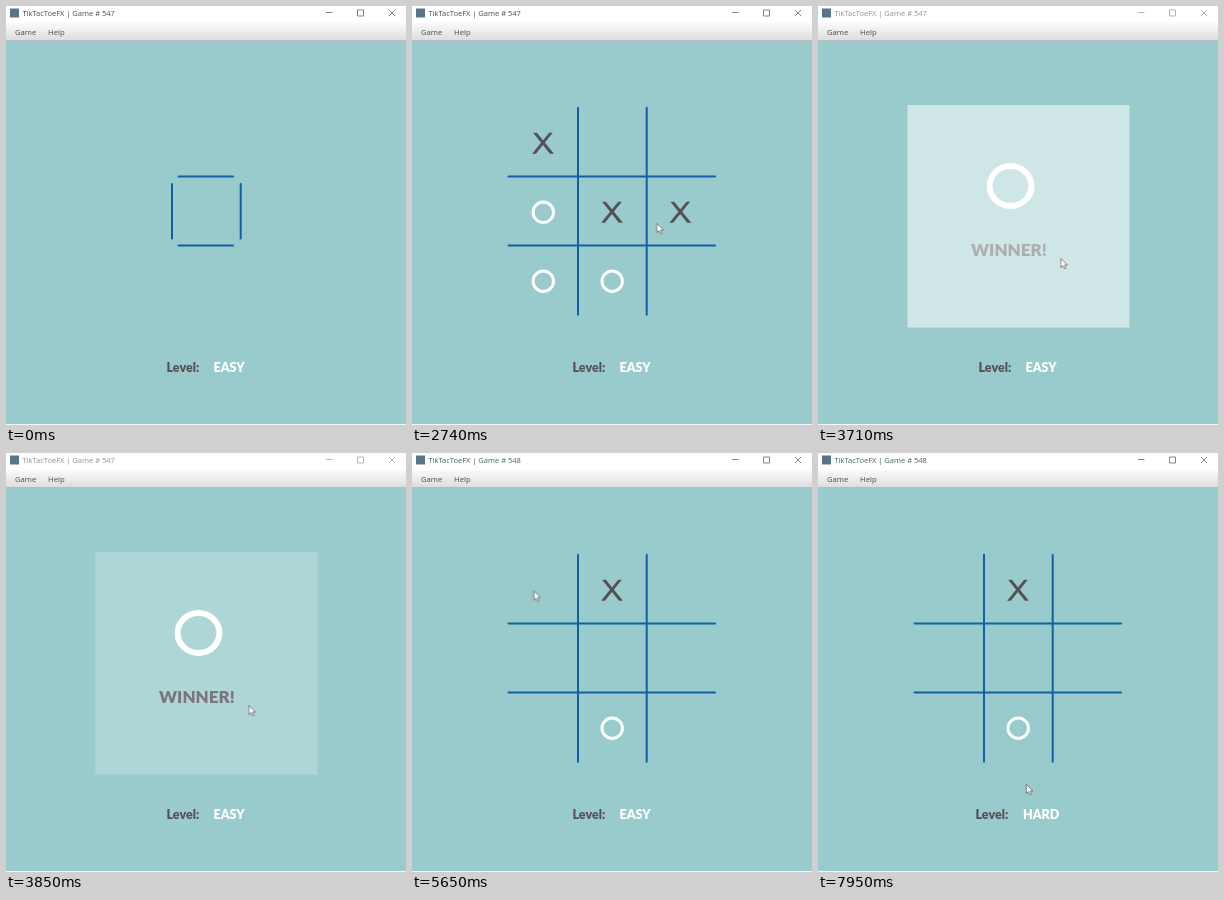
Animation of 400 by 419 pixels, one loop 8 s. Source, as an HTML page:

```html
<!DOCTYPE html>
<html lang="en">
<head>
<meta charset="utf-8">
<title>TikTacToeFX</title>
<style>
html, body { margin: 0; width: 100%; height: 100%; overflow: hidden; background: #99cbcc; }
svg { display: block; width: 100%; height: 100%; }
text { font: 7.7px "Open Sans", "Noto Sans", sans-serif; fill: #4a4a4a; }
.title { font-size: 7.5px; }
.bold { font: 900 12.5px Lato, "Open Sans", sans-serif; fill: #555056; }
.win { font-size: 17px; }
.white { fill: #fff; }
.hi { fill: #0096c9; }
.grid line { stroke: #1160a6; stroke-width: 2; stroke-linecap: round; vector-effect: non-scaling-stroke; }
.popup { filter: drop-shadow(0 1.5px 2px #0007); }

/* 1% = 80 ms */
.step, .flash, .cursor, .grid line { animation: 8s infinite; }
.step { animation-timing-function: step-end; }
.grid .h { animation-name: growX; transform-origin: 199.8px 205px; }
.grid .v { animation-name: growY; transform-origin: 200px 205.3px; }
@keyframes growX {
  0% { transform: scaleX(.264); animation-timing-function: steps(6); }
  5.25% { transform: none; animation-timing-function: step-end; }
  57.75% { transform: scaleX(.264); animation-timing-function: steps(3); }
  60.375%, 100% { transform: none; }
}
@keyframes growY {
  0% { transform: scaleY(.264); animation-timing-function: steps(6); }
  5.25% { transform: none; animation-timing-function: step-end; }
  57.75% { transform: scaleY(.264); animation-timing-function: steps(3); }
  60.375%, 100% { transform: none; }
}
.grid { animation-name: grid; }
@keyframes grid { 0% { opacity: 1 } 43.75% { opacity: 0 } 57.75%, 100% { opacity: 1 } }

.round1 { animation-name: round1; }
@keyframes round1 { 0% { opacity: 1 } 43.75%, 100% { opacity: 0 } }
.m1 { animation-name: m1; }
@keyframes m1 { 0% { opacity: 0 } 18.875%, 100% { opacity: 1 } }
.m2 { animation-name: m2; }
@keyframes m2 { 0% { opacity: 0 } 24.625%, 100% { opacity: 1 } }
.m3 { animation-name: m3; }
@keyframes m3 { 0% { opacity: 0 } 29.25%, 100% { opacity: 1 } }
.m4 { animation-name: m4; }
@keyframes m4 { 0% { opacity: 0 } 40.25%, 100% { opacity: 1 } }
.round2 { animation-name: round2; }
@keyframes round2 { 0% { opacity: 0 } 65.875%, 100% { opacity: 1 } }

.winner { animation-name: winner; }
@keyframes winner { 0% { opacity: 0 } 43.75% { opacity: 1 } 57.5%, 100% { opacity: 0 } }
.flash { animation-name: flash; animation-timing-function: linear; }
@keyframes flash { 0%, 41.125% { opacity: 0 } 43.75% { opacity: 1 } 49.375%, 100% { opacity: 0 } }

.before { animation-name: before; }
@keyframes before { 0% { opacity: 1 } 57.75%, 100% { opacity: 0 } }
.after { animation-name: after; }
@keyframes after { 0% { opacity: 0 } 57.75%, 100% { opacity: 1 } }
.chrome { animation-name: chrome; }
@keyframes chrome { 0% { opacity: 1 } 41.125% { opacity: .6 } 57.75%, 100% { opacity: 1 } }

.menu { animation-name: menu; }
@keyframes menu { 0% { opacity: 0 } 77.25% { opacity: 1 } 92.5%, 100% { opacity: 0 } }
.row { animation-name: row; }
@keyframes row { 0% { opacity: 0 } 79.75%, 100% { opacity: 1 } }
.sub { animation-name: sub; }
@keyframes sub { 0% { opacity: 0 } 81.875% { opacity: 1 } 92.5%, 100% { opacity: 0 } }
.pickEasy { animation-name: pickEasy; }
@keyframes pickEasy { 0% { opacity: 1 } 89.25%, 100% { opacity: 0 } }
.pickHard { animation-name: pickHard; }
@keyframes pickHard { 0% { opacity: 0 } 89.25%, 100% { opacity: 1 } }
.easy { animation-name: easy; }
@keyframes easy { 0% { opacity: 1 } 92.5%, 100% { opacity: 0 } }
.hard { animation-name: hard; }
@keyframes hard { 0% { opacity: 0 } 92.5%, 100% { opacity: 1 } }

.show { animation-name: show; }
@keyframes show { 0% { opacity: 0 } 11.875%, 100% { opacity: 1 } }
.click { animation-name: click; }
@keyframes click {
  0% { opacity: 0 }
  16.125% { opacity: .9 } 18.875% { opacity: 0 }
  23.6% { opacity: .9 } 24.625% { opacity: 0 }
  28.3% { opacity: .9 } 29.25% { opacity: 0 }
  38.5% { opacity: .9 } 40.25% { opacity: 0 }
  56.5% { opacity: .9 } 57.6% { opacity: 0 }
  64.5% { opacity: .9 } 65.875% { opacity: 0 }
  76.3% { opacity: .9 } 77.25% { opacity: 0 }
  91.4% { opacity: .9 } 92.5%, 100% { opacity: 0 }
}
.cursor { animation-name: cursor; animation-timing-function: ease-in-out; }
@keyframes cursor {
  0%, 11.875% { transform: translate(221px, 204px) }
  16.125%, 18.875% { transform: translate(147px, 138px) }
  19.75% { transform: translate(149.5px, 148px) }
  23.5%, 24.625% { transform: translate(206px, 213px) }
  27.875%, 29.25% { transform: translate(267px, 211px) }
  34.25% { transform: translate(244.5px, 217px) }
  38.25%, 40.625% { transform: translate(208px, 139px) }
  46.375%, 50.875% { transform: translate(242.5px, 252px) }
  56%, 57.5% { transform: translate(259.5px, 222.5px) }
  60.375% { transform: translate(230px, 185px) }
  64.125%, 66.25% { transform: translate(205px, 131px); animation-timing-function: linear }
  70.625% { transform: translate(122px, 138px); animation-timing-function: ease-out }
  75.75%, 77.75% { transform: translate(20px, 25px) }
  80.75%, 84.375% { transform: translate(25px, 40px) }
  87.5% { transform: translate(84px, 48px) }
  90%, 95.125% { transform: translate(97px, 65px) }
  99.375%, 100% { transform: translate(208px, 331px) }
}
</style>
</head>
<body>
<svg viewBox="0 0 400 419">
  <defs>
    <linearGradient id="bar" x2="0" y2="1">
      <stop stop-color="#fafafa"/><stop offset="1" stop-color="#dedede"/>
    </linearGradient>
    <path id="x" fill="#555056" d="M-9.9-10.5h3.8L10.9 10.5h-4zM6.2-10.5h3.6L-7.1 10.5h-3.8z"/>
    <circle id="o" r="10.2" fill="none" stroke="#fff" stroke-width="3"/>
  </defs>

  <rect width="400" height="419" fill="#99cbcc"/>
  <rect y="418" width="400" height="1" fill="#f4f8f8"/>
  <rect width="400" height="17" fill="#fff"/>
  <rect x="4" y="2.5" width="9" height="9" fill="#58768a"/>
  <g class="step chrome">
    <text class="title step before" x="16.5" y="10">TikTacToeFX | Game # 547</text>
    <text class="title step after" x="16.5" y="10" style="fill:#466260">TikTacToeFX | Game # 548</text>
    <path d="M320 6.5h6.5M351.5 4h6v6h-6zM383 4l6 6m0-6l-6 6" fill="none" stroke="#666" stroke-width=".8"/>
  </g>
  <rect y="17" width="400" height="17" fill="url(#bar)"/>
  <rect y="34" width="400" height="1" fill="#b4bcbc"/>
  <text x="9" y="28.5">Game</text>
  <text x="42" y="28.5">Help</text>

  <g class="step grid">
    <line class="h" x1="96.5" x2="303" y1="170.5" y2="170.5"/>
    <line class="h" x1="96.5" x2="303" y1="239.4" y2="239.4"/>
    <line class="v" x1="166" x2="166" y1="101.8" y2="308.8"/>
    <line class="v" x1="234.7" x2="234.7" y1="101.8" y2="308.8"/>
  </g>

  <g class="step round1">
    <g class="step m1"><use href="#x" x="131" y="137.3"/><use href="#o" x="131.3" y="275.2"/></g>
    <g class="step m2"><use href="#x" x="200" y="206.3"/><use href="#o" x="200.2" y="275.2"/></g>
    <g class="step m3"><use href="#x" x="268.3" y="206.3"/><use href="#o" x="131.3" y="206.3"/></g>
    <g class="step m4"><use href="#x" x="200" y="137.3"/><use href="#o" x="268.6" y="275.2"/></g>
  </g>
  <g class="step round2"><use href="#x" x="200" y="137.3"/><use href="#o" x="200.2" y="275.2"/></g>

  <g class="step winner">
    <ellipse cx="192.5" cy="180" rx="20.9" ry="20" fill="none" stroke="#fff" stroke-width="6"/>
    <text class="bold win" x="153" y="250">WINNER!</text>
  </g>
  <rect class="flash" x="89.5" y="99" width="222" height="222.5" fill="#fff"/>

  <g class="step easy">
    <text class="bold" x="160.5" y="366">Level:</text>
    <text class="bold white" x="207.5" y="366">EASY</text>
  </g>
  <g class="step hard">
    <text class="bold" x="157.5" y="366">Level:</text>
    <text class="bold white" x="205" y="366">HARD</text>
  </g>

  <g class="step menu">
    <rect class="hi" x="4" y="17" width="31.5" height="17"/>
    <text class="white" x="9" y="28.5">Game</text>
    <rect class="popup" x="4" y="35.5" width="71" height="57.5" fill="#fff"/>
    <text x="7.5" y="48.5">Difficulty Level</text>
    <path d="M69 42.5l3 3-3 3z" fill="#555"/>
    <g class="step row">
      <rect class="hi" x="4.5" y="37" width="70" height="17"/>
      <text class="white" x="7.5" y="48.5">Difficulty Level</text>
      <path class="white" d="M69 42.5l3 3-3 3z"/>
    </g>
    <text x="7.5" y="65.5">Options</text>
    <path d="M5 72.5h69" stroke="#c4c4c4" stroke-width=".8"/>
    <text x="7.5" y="85">Exit</text>
  </g>
  <g class="step sub">
    <rect class="popup" x="75" y="38" width="42.5" height="56" fill="#fff"/>
    <text x="88" y="51.3">EASY</text>
    <text x="88" y="68.5">HARD</text>
    <text x="88" y="85.5">AI</text>
    <path d="M79.5 48.5l2 2.5 3.5-5.5" fill="none" stroke="#444" stroke-width="1.6"/>
    <g class="step pickEasy">
      <rect class="hi" x="75.5" y="39.7" width="41.5" height="17.3"/>
      <text class="white" x="88" y="51.3">EASY</text>
      <path d="M79.5 48.5l2 2.5 3.5-5.5" fill="none" stroke="#fff" stroke-width="1.6"/>
    </g>
    <g class="step pickHard">
      <rect class="hi" x="75.5" y="57" width="41.5" height="17.3"/>
      <text class="white" x="88" y="68.5">HARD</text>
    </g>
  </g>

  <g class="step show">
    <g class="cursor">
      <circle class="step click" r="8" fill="#cce04c"/>
      <path d="M.3.4v9.2l2.1-2 1.5 3.3 1.6-.7-1.5-3.2h2.9z" fill="#fff" stroke="#555" stroke-width=".7" stroke-linejoin="round"/>
    </g>
  </g>
</svg>
</body>
</html>
```
